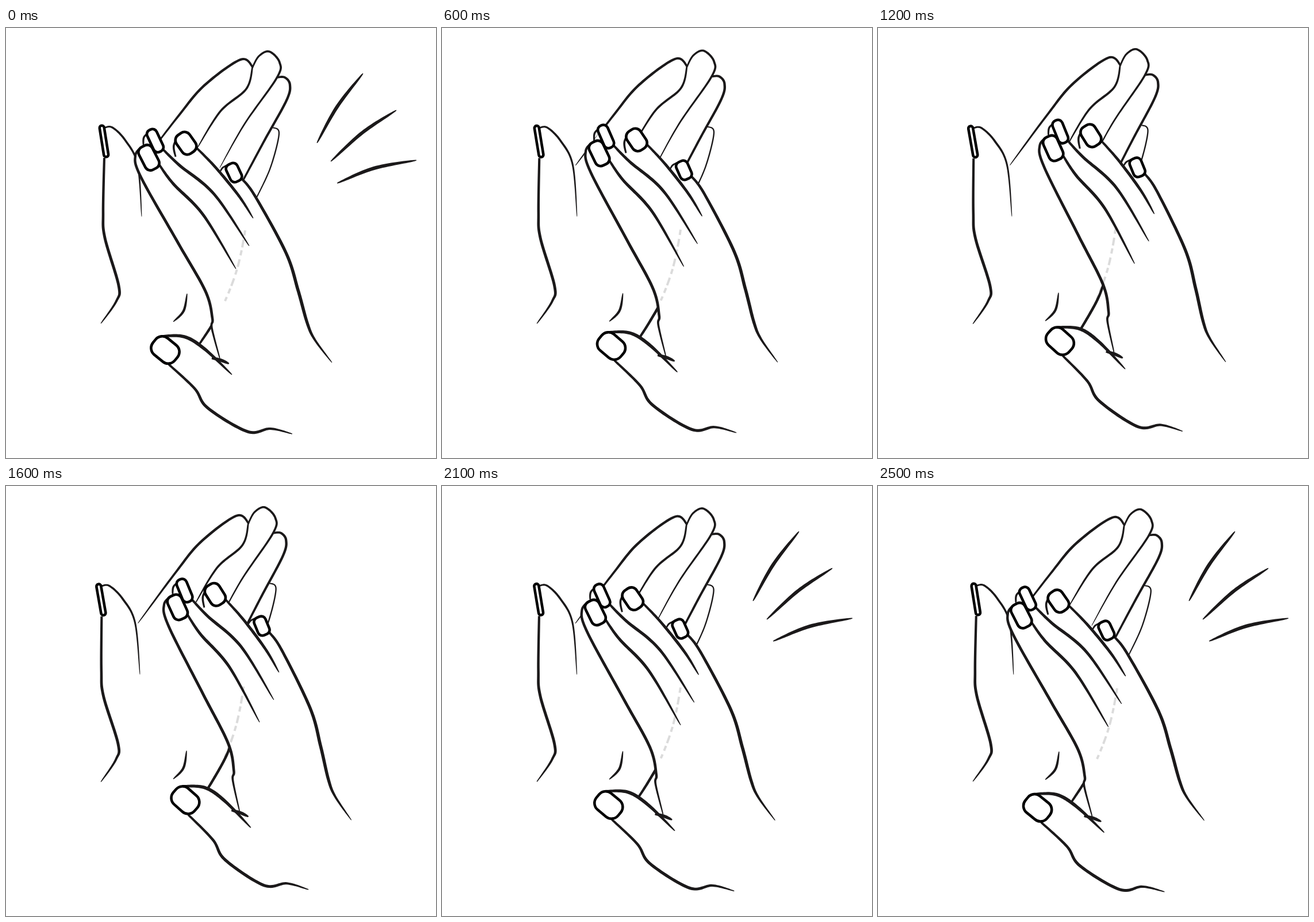
An HTML page for the animation above (2.6 s loop, 748 px wide and 748 px high).

```html
<!DOCTYPE html>
<html lang="en">
<head>
<meta charset="utf-8">
<title>Clapping hands</title>
<style>
  html, body { margin: 0; width: 100%; height: 100%; overflow: hidden; background: #fff; }
  svg { display: block; width: 100%; height: 100%; }
  .ink { fill: #1b191a; }
  .skin { fill: #fff; }
  .nail { fill: #fff; stroke: #000; stroke-width: 4.6; }
  .ghost { fill: none; stroke: #000; stroke-opacity: .14; stroke-width: 4; stroke-dasharray: 9 7 14 5; mix-blend-mode: multiply; }
</style>
</head>
<body>
<svg viewBox="0 0 748 748">
  <g id="back"></g>
  <g id="front"></g>
  <g id="shade"><path class="ghost" d="M416 352Q411 385 404 412T381 475"/></g>
  <g id="marks"></g>
</svg>
<script>
const LOOP = 2600, STEP = 100;
// Share of the full width left at the start and end of a line
const EVEN = [.75, .75], OUT = [.7, .2], BOTH = [.2, .2];

const $ = id => document.getElementById(id);
const back = $('back'), front = $('front'), shade = $('shade'), marks = $('marks');

function add(group, tag, attrs) {
  const el = document.createElementNS('http://www.w3.org/2000/svg', tag);
  for (const name in attrs) el.setAttribute(name, attrs[name]);
  group.append(el);
  return el;
}

const parse = text => text.split(' ').map(p => p.split(',').map(Number));
const outline = pts => 'M' + pts.map(p => p[0].toFixed(2) + ' ' + p[1].toFixed(2)).join('L') + 'Z';

// Catmull-Rom curve through a few key points
function spline(pts) {
  const last = pts.length - 1, out = [];
  const at = i => pts[Math.max(0, Math.min(last, i))];
  for (let i = 0; i < last; i++) {
    const [a, b, c, d] = [at(i - 1), at(i), at(i + 1), at(i + 2)];
    for (let u = 0; u < 1; u += 1 / 16) {
      out.push(b.map((v, j) => v + u / 2 * (c[j] - a[j] +
        u * (2 * a[j] - 5 * v + 4 * c[j] - d[j] + u * (3 * (v - c[j]) + d[j] - a[j])))));
    }
  }
  return [...out, pts[last]];
}

// Ink line that swells in the middle; returns its centre line
function brush(group, width, [from, to], text) {
  const pts = spline(parse(text)), left = [], right = [];
  const last = pts.length - 1;
  pts.forEach(([x, y], i) => {
    const s = i / last, end = from + (to - from) * s;
    const w = width * (end + (1 - end) * Math.sin(Math.PI * s) ** .7);
    const a = pts[Math.max(0, i - 1)], b = pts[Math.min(last, i + 1)];
    const dx = b[0] - a[0], dy = b[1] - a[1], k = w / 2 / Math.hypot(dx, dy);
    left.push([x - dy * k, y + dx * k]);
    right.unshift([x + dy * k, y - dx * k]);
  });
  add(group, 'path', { class: 'ink', d: outline([...left, ...right]) });
  return pts;
}

function nail(group, x, y, width, height, rx, angle) {
  add(group, 'rect', {
    class: 'nail', x: -width / 2, y: -height / 2, width, height, rx,
    transform: `translate(${x} ${y}) rotate(${angle})`
  });
}

function drawBack() {
  const line = (...args) => brush(back, ...args);
  line(5, [.2, .8], '165,514 192,475 196,448 172,365 169,320 171,226');
  line(3.6, OUT, '170,174 185,173 208,196 229,238 236,328');
  line(4.4, [.2, .8], '234,239 300,153 345,100 408,55 430,69');
  line(3.8, OUT, '429,67 418,106 373,145 332,210');
  line(3.8, OUT, '429,68 440,49 458,41 476,60 471,87 415,167 372,243');
  line(4.3, EVEN, '471,86 485,86 494,99 488,126 450,195 413,264');
  line(2.4, EVEN, '464,173 475,184 460,243 435,297');
  line(4.6, EVEN, '400,428 385,470 360,514 337,549');
  line(4.2, BOTH, '291,511 309,492 315,462');
  nail(back, 170.5, 197, 8, 55, 4, -9);
}

function drawFront() {
  const skin = add(front, 'path', { class: 'skin' });
  const line = (...args) => brush(front, ...args);
  const index = line(5, [.7, .3], '240,204 225,222 235,260 300,375 347,458 359,505 358,522 372,575');
  const side = line(5.6, [.7, .15], '410,262 433,292 487,391 508,456 524,513 537,542 567,582');
  const thumb = line(6, [.6, .2], '271,536 310,537 345,558 393,603');
  const heel = line(5.2, [.7, .2], '283,585 328,627 351,661 420,702 460,697 498,706');
  const tips = parse('387,236 373,249 330,207 308,182 292,206 295,224 273,211 256,176 239,203');
  skin.setAttribute('d', outline([...index, ...thumb.reverse(), ...heel, ...side.reverse(), ...tips]));

  line(5.2, OUT, '266,237 291,271 343,325 400,419');
  line(5.2, OUT, '273,211 302,239 362,289 423,379');
  line(5, OUT, '330,207 365,243 405,292 430,331');
  line(3.4, EVEN, '250,180 240,190 239,203');
  line(3.6, EVEN, '303,184 292,204 295,224');
  line(3, EVEN, '386,238 377,243 373,249');
  line(5.6, OUT, '358,574 374,578 388,584');

  nail(front, 259.5, 196, 18, 42, 8, -25);
  nail(front, 248.5, 225.5, 26, 44, 10, -27);
  nail(front, 313, 200.5, 28, 39, 11, -35);
  nail(front, 396.5, 251.5, 21, 33, 8, -25);
  nail(front, 277, 560, 37, 49, 15, -51);
}

function drawMarks() {
  ['541,200 576,137 621,79', '565,232 620,182 679,143', '576,270 640,244 714,230']
    .forEach(text => brush(marks, 6, BOTH, text));
}

const swing = t => (1 - Math.cos(2 * Math.PI * t / LOOP)) / 2;

function pose(now) {
  const t = Math.floor(now % LOOP / STEP) * STEP;
  const open = 1.015 * swing(t);
  const tilt = `rotate(${-swing(t - 80)} 215 514)`; // the rear hand follows a little late
  back.setAttribute('transform', tilt);
  shade.setAttribute('transform', tilt);
  front.setAttribute('transform', `translate(${38 * open} ${-open}) rotate(${2.865 * open} 566 581)`);
  marks.setAttribute('visibility', t < 200 || t >= 1800 ? 'visible' : 'hidden');
}

drawBack();
drawFront();
drawMarks();

const start = performance.now();
function tick() {
  pose(performance.now() - start);
  requestAnimationFrame(tick);
}
tick();
</script>
</body>
</html>
```
